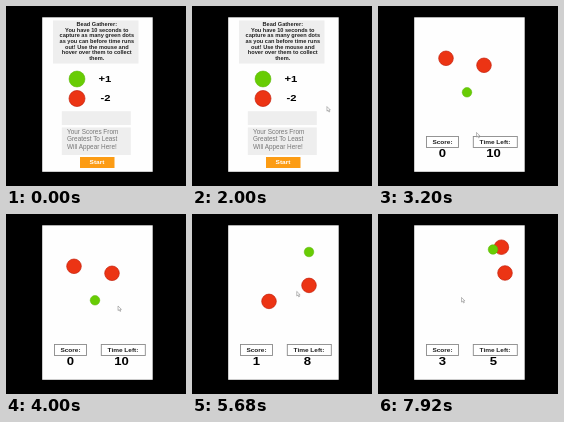
An HTML page that plays this animation: 180 px wide and 180 px high, repeating every 8 s.

```html
<!DOCTYPE html>
<html lang="en">
<head>
<meta charset="utf-8">
<style>
html, body { margin: 0; height: 100%; overflow: hidden; background: #000 }
svg { display: block; width: 100vw; height: 100vh; font-family: "Liberation Sans", Arial, sans-serif }
.wide text { font-weight: bold; text-anchor: middle; transform-box: fill-box; transform-origin: center; transform: scaleX(1.25) }
.box { fill: #eee }
.label { fill: #fff; stroke: #8a8a8a; stroke-width: .9 }
.red { fill: #ec3414; stroke: #c4200c; stroke-width: .7 }
.green { fill: #68cc04; stroke: #58b408; stroke-width: .5 }
</style>
</head>
<body>
<svg viewBox="0 0 180 180">
  <rect x="36.2" y="11.3" width="110.5" height="154.5" fill="#fefefe"/>
  <g id="intro">
    <rect class="box" x="47" y="14.5" width="85.5" height="43"/>
    <g class="wide" id="rules" font-size="4.5" fill="#222"></g>
    <circle class="green" cx="71" cy="73" r="8"/>
    <circle class="red" cx="71" cy="92.5" r="8"/>
    <g class="wide" font-size="9">
      <text x="99" y="76">+1</text>
      <text x="99.5" y="95">-2</text>
    </g>
    <rect class="box" x="55.8" y="105.2" width="69" height="13.8"/>
    <rect class="box" x="55.8" y="121.5" width="69" height="27.5"/>
    <g font-size="6.4" fill="#777">
      <text x="61" y="127.9">Your Scores From</text>
      <text x="61" y="135.4">Greatest To Least</text>
      <text x="61" y="142.9">Will Appear Here!</text>
    </g>
    <rect x="74" y="151" width="34.5" height="11" fill="#fc9c14"/>
    <g class="wide" font-size="5.2" fill="#fff"><text x="91" y="158.5">Start</text></g>
  </g>
  <g id="game">
    <circle class="red" id="back" r="7.3"/>
    <circle class="green" id="dot" r="4.8"/>
    <circle class="red" id="front" r="7.3"/>
    <rect class="label" x="48.5" y="130.5" width="32" height="11"/>
    <rect class="label" x="95.3" y="130.5" width="44" height="11"/>
    <g class="wide" font-size="5.2" fill="#222">
      <text x="64.5" y="138">Score:</text>
      <text x="117" y="138">Time Left:</text>
    </g>
    <g class="wide" font-size="10.5">
      <text id="score" x="64.5" y="151.2"></text>
      <text id="time" x="115.5" y="151.2"></text>
    </g>
  </g>
  <path id="cursor" d="M0 0V4.6L1.1 3.7L2 5.5L2.8 5.1L1.9 3.4H3.4Z" fill="#fff" stroke="#777" stroke-width=".5"/>
</svg>
<script>
const LOOP = 8000, ENTER = 1040, CLICK = 2880, PLAY = 3200;
const $ = id => document.getElementById(id);

const rules = ['Bead Gatherer:', 'You have 10 seconds to', 'capture as many green dots',
  'as you can before time runs', 'out! Use the mouse and', 'hover over them to collect', 'them.'];
$('rules').innerHTML = rules.map((line, i) =>
  `<text x="90.8" y="${20 + i * 5.65}">${line}</text>`).join('');

// Centres of the back red, green and front red dots; the last layout stays
const layouts = [
  [[68, 52.3], [89, 86.3], [106, 59.3]],
  [[107, 108.4], [131.5, 59.3], [124.4, 60.3]],
  [[77, 87.4], [117, 38], [117, 71.4]],
  [[79, 47.2], [69.5, 107], [84.5, 81.2]],
  [[123.4, 33.2], [115, 35.5], [127, 59]]
];

// Cursor stops: rest, on to the button, then the chase
const stops = [[135, 100.5], [114, 128], [93, 156], [98.5, 126.5], [112, 92],
  [133.5, 70], [104, 82], [111.5, 36.5], [70, 106], [85, 81]];

// Seconds run slightly faster as the game goes on
const tickAt = n => CLICK + n * (1256 - 56 * n);
const scoreAt = t => Math.max(0, Math.floor((t - 4720) / 1220) + 1);

function tip(t) {
  const step = t < PLAY ? Math.max(0, (t - 2000) / 400) : 3 + (t - PLAY) / 800;
  const i = Math.floor(step), k = step - i;
  const next = stops[i + 1];
  return stops[i].map((v, axis) => v + (next[axis] - v) * k);
}

function show(id, on) {
  $(id).style.display = on ? '' : 'none';
}

function place(id, [x, y]) {
  $(id).setAttribute('transform', `translate(${x} ${y})`);
}

function draw() {
  const t = performance.now() % LOOP, playing = t >= CLICK;
  show('intro', !playing);
  show('game', playing);
  show('cursor', t >= ENTER);
  place('cursor', tip(t));
  if (playing) {
    let n = 0;
    while (n < 5 && tickAt(n + 1) <= t) n++;
    const layout = layouts[Math.min(n, layouts.length - 1)];
    ['back', 'dot', 'front'].forEach((id, i) => place(id, layout[i]));
    $('score').textContent = scoreAt(t);
    $('time').textContent = 10 - n;
  }
  requestAnimationFrame(draw);
}
draw();
</script>
</body>
</html>
```
